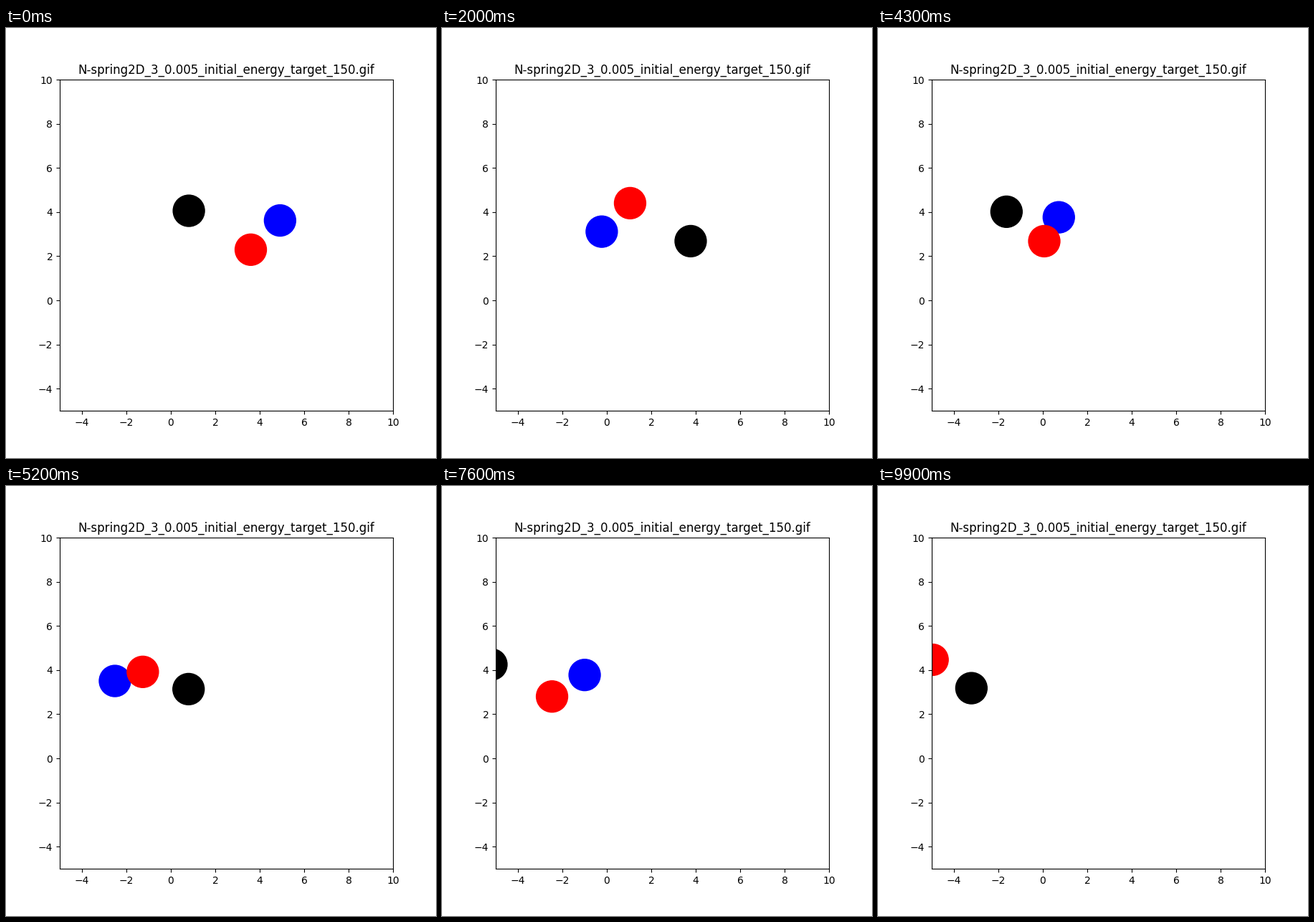
Recreate the animation shown at these times as a matplotlib script. Size 600x600 px, loop 10000 ms.

```python
import numpy as np
import matplotlib.pyplot as plt
from matplotlib.animation import FuncAnimation

FRAMES, INTERVAL = 100, 100
DT, SUBSTEPS = 0.005, 20
COLORS = ["blue", "red", "black"]

# A few waypoints of the orbit in stage pixels (blue, red, black).
WAYPOINTS = {
    0: [(382.5, 268.5), (341.5, 309.5), (255, 255)],
    35: [(296, 269), (252, 295), (174.5, 256.5)],
    62: [(144, 279), (165.5, 246.5), (214.5, 286)],
    99: [(46.4, 273.9), (76, 242.5), (130.5, 282)],
}


def to_data(pixels):
    p = np.asarray(pixels, float)
    return np.stack([(p[..., 0] - 75) / 31 - 5, 10 - (p[..., 1] - 72) / 30.8], -1)


def acceleration(pos, k, rest):
    """Every pair of unit masses is joined by a spring."""
    gap = pos - np.roll(pos, -1, axis=1)
    dist = np.sqrt((gap ** 2).sum(-1, keepdims=True) + 1e-9)
    pull = k * (1 - rest / dist) * gap
    return np.roll(pull, 1, axis=1) - pull


def simulate(params):
    """Velocity Verlet on a batch of systems; returns (frame, batch, ball, xy)."""
    pos = params[:, :6].reshape(-1, 3, 2).copy()
    vel = params[:, 6:12].reshape(-1, 3, 2).copy()
    k, rest = params[:, 12, None, None], params[:, 13, None, None]
    path = [pos.copy()]
    acc = acceleration(pos, k, rest)
    for _ in range(FRAMES - 1):
        for _ in range(SUBSTEPS):
            vel += 0.5 * DT * acc
            pos += DT * vel
            acc = acceleration(pos, k, rest)
            vel += 0.5 * DT * acc
        path.append(pos.copy())
    return np.array(path)


def solve_orbit(rounds=8, eps=1e-4):
    """Gauss-Newton for the launch state, stiffness and rest length."""
    keys = list(WAYPOINTS)
    goal = to_data(list(WAYPOINTS.values()))
    duration = (FRAMES - 1) * SUBSTEPS * DT
    drift = (goal[-1] - goal[0]).mean(axis=0) / duration
    params = np.concatenate([goal[0].ravel(), np.tile(drift, 3), [1.0, 0.25]])
    for _ in range(rounds):
        batch = np.vstack([params, params + eps * np.eye(params.size)])
        reached = simulate(batch)[keys].swapaxes(0, 1).reshape(len(batch), -1)
        slope = (reached[1:] - reached[0]).T / eps
        params = params + np.linalg.lstsq(slope, goal.ravel() - reached[0], rcond=None)[0]
    return simulate(params[None])[:, 0]


orbit = solve_orbit()

fig, ax = plt.subplots(figsize=(6, 6), dpi=100)
ax.set_xlim(-5, 10)
ax.set_ylim(-5, 10)
ax.set_title("N-spring2D_3_0.005_initial_energy_target_150.gif")
balls = ax.scatter(orbit[0, :, 0], orbit[0, :, 1], s=1000, c=COLORS)


def draw(frame):
    balls.set_offsets(orbit[frame])
    return (balls,)


anim = FuncAnimation(fig, draw, frames=FRAMES, interval=INTERVAL,
                     repeat=True, repeat_delay=0)
plt.show()
```
